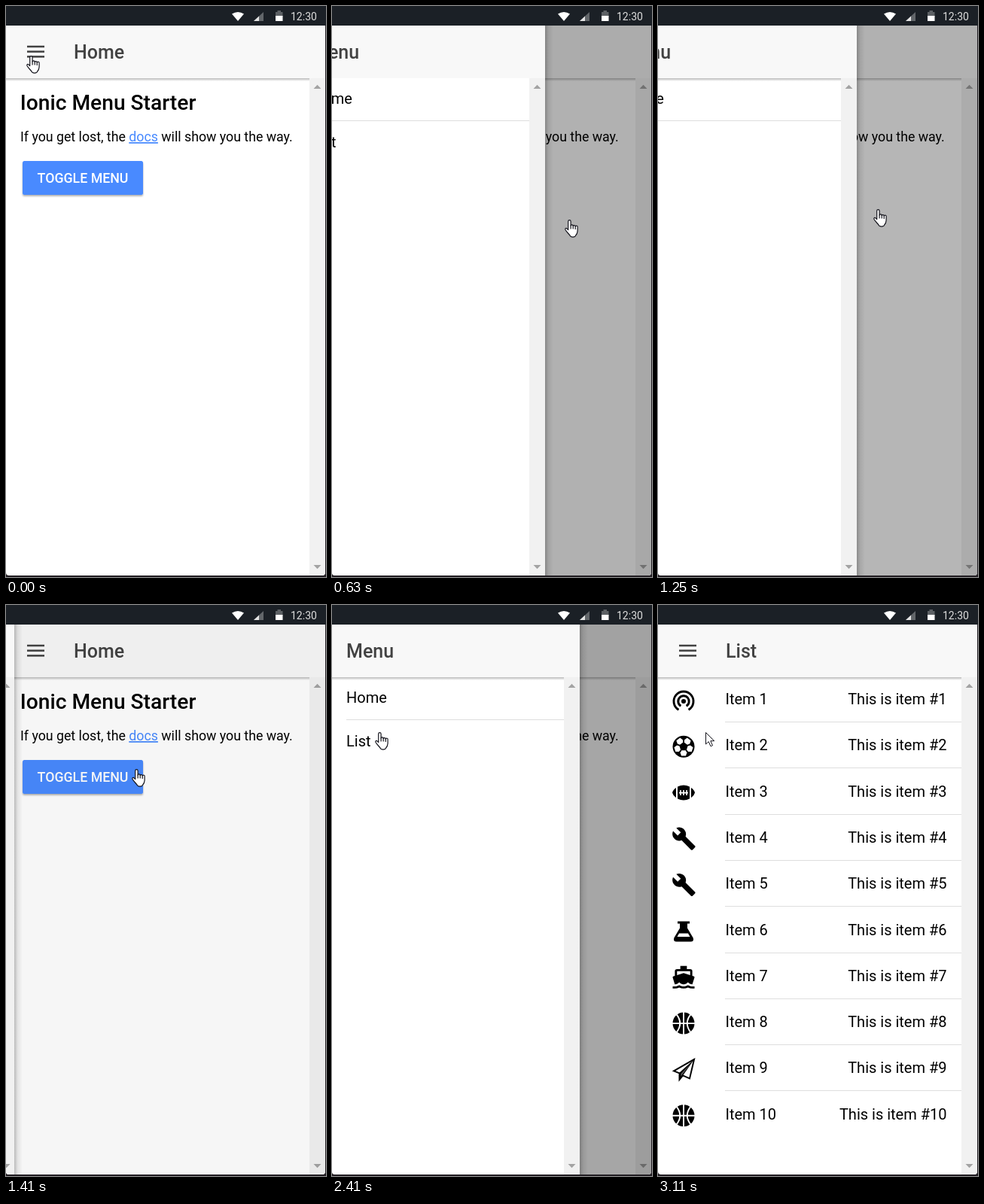
These frames come from a looping animation (425 by 759 pixels, 3.49 s). An HTML page:

```html
<!DOCTYPE html>
<html lang="en">
<head>
<meta charset="utf-8">
<title>Side menu</title>
<style>
  html, body { margin: 0; width: 100%; height: 100%; overflow: hidden; background: #fff; }
  svg { display: block; width: 425px; height: 759px; font-family: Roboto, "Noto Sans", sans-serif; }
  .title { font-size: 25px; font-weight: 500; fill: #424242; }
  .item { font-size: 20px; }
  .copy { font-size: 17.75px; }
  .line { stroke: #dedede; stroke-width: 1; }
</style>
</head>
<body>
<svg viewBox="0 0 425 759">
  <defs>
    <linearGradient id="below" x2="0" y2="1">
      <stop offset="0" stop-opacity=".27"/><stop offset="1" stop-opacity="0"/>
    </linearGradient>
    <linearGradient id="beside">
      <stop offset="0" stop-opacity=".24"/><stop offset=".4" stop-opacity=".08"/><stop offset="1" stop-opacity="0"/>
    </linearGradient>
    <filter id="lift" x="-5%" y="-10%" width="110%" height="130%">
      <feDropShadow dx="0" dy="1.8" stdDeviation="1.2" flood-opacity=".32"/>
    </filter>
    <clipPath id="screen"><path d="M0 26H424V753a4 4 0 0 1-4 4H4a4 4 0 0 1-4-4z"/></clipPath>
  </defs>

  <rect width="425" height="759" fill="#231f24"/>
  <rect width="425" height="26" fill="#1b2026"/>
  <path d="M300 10.5Q308 5.5 316 10.5L308 20z" fill="#fff"/>
  <path d="M329 20L342 8V20z" fill="#62666a"/>
  <path d="M329 20L336 13.5V20z" fill="#e4e4e4"/>
  <path d="M358 8h2.500v-2h4.500v2h2.500v6h-9.500z" fill="#5d6165"/>
  <rect x="358" y="13" width="9.500" height="7" fill="#fff"/>
  <text x="378" y="19" font-size="14" fill="#dcdcdc">12:30</text>

  <g clip-path="url(#screen)">
    <rect y="26" width="424" height="731" fill="#fff"/>
    <g id="home"></g>
    <g id="list"></g>
    <rect id="backdrop" y="26" width="424" height="731"/>
    <g id="panel"></g>
  </g>

  <g id="hand" fill="#fff" stroke="#14141c" stroke-width="1.2" stroke-linejoin="round" stroke-linecap="round">
    <path d="M4.700 13.500V2.400a1.700 1.700 0 0 1 3.400 0V8a1.600 1.600 0 0 1 3.100.4a1.600 1.600 0 0 1 3 .8a1.500 1.500 0 0 1 2.900 1V15c0 3.500-1.700 5.500-3.200 7.200q-3 1.700-6 0C6.300 19.500 3 17 1 13.500c-.8-1.800 1.200-2.800 2.300-1.400z"/>
    <path d="M8.100 8v4M11.200 8.500v3.500M14.200 9.500v3" fill="none"/>
  </g>
  <path id="arrow" transform="translate(63.500 169.500)" d="M0 0V15.500L3.700 12.100L6.500 18.300L9 17.200L6.300 11.200H11.200z" fill="#fff" stroke="#14141c"/>
</svg>
<script>
const byId = id => document.getElementById(id);
const repeat = (n, make) => Array.from({ length: n }, (_, i) => make(i)).join('');

const WIDTH = 329, LOOP = 3490;

const toolbar = (width, title, x) => `
  <rect y="26" width="${width}" height="70" fill="#f8f8f8"/>
  <rect class="shade" y="96" width="${width}" height="4" fill="url(#below)"/>
  <text class="title" x="${x}" y="70">${title}</text>`;

const hamburger = repeat(3, i =>
  `<rect x="28" y="${52.7 + i * 6.7}" width="23" height="2.500" fill="#424242"/>`);

const scrollbar = x => `
  <rect x="${x}" y="96" width="21" height="661" fill="#f1f1f1"/>
  <path d="M${x + 5.5} 110l5-5.200l5 5.200zM${x + 5.5} 743l5 5.200l5-5.200z" fill="#a3a3a3"/>`;

const divider = (x1, x2, y) => `<path class="line" d="M${x1} ${y}H${x2}"/>`;

// Icons are drawn around their own centre.
const polar = (r, deg) => {
  const a = deg * Math.PI / 180;
  return `${(r * Math.cos(a)).toFixed(2)},${(r * Math.sin(a)).toFixed(2)}`;
};
const disc = '<circle r="14.500"/>';
const wrench = `<path transform="scale(1.38) translate(-11.700 -12.200)" d="M22.700 19l-9.100-9.100c.9-2.300.4-5-1.500-6.900-2-2-5-2.400-7.400-1.300L9 6 6 9 1.600 4.700C.4 7.100.9 10.100 2.900 12.100c1.900 1.900 4.600 2.400 6.900 1.500l9.100 9.100c.4.4 1 .4 1.400 0l2.300-2.300c.5-.4.5-1.100.1-1.400z"/>`;
const basketball = disc + `<path d="M0-15V15M-15 0H15M-9.500-12Q0 0-9.500 12M9.500-12Q0 0 9.500 12" fill="none" stroke="#fff" stroke-width="1.900"/>`;
const soccer = disc + repeat(5, i => {
  const a = i * 72 - 54;
  const points = [[5.6, -27], [9, -29], [12.6, -14], [12.6, 14], [9, 29], [5.6, 27]];
  return `<polygon fill="#fff" points="${points.map(([r, d]) => polar(r, a + d)).join(' ')}"/>`;
});
const tether = `<g transform="translate(0 1) scale(1.45)"><circle r="2.100"/>
  <path d="M-4.500 7.800A9 9 0 1 1 4.500 7.800M-2.500 4.330A5 5 0 1 1 2.500 4.330" fill="none" stroke="#000" stroke-width="2"/></g>`;
const football = `<path d="M-8-8Q0-12 8-8V8Q0 12-8 8zM-10-6.500V6.500Q-14 4-15 0Q-14-4-10-6.500zM10-6.500V6.500Q14 4 15 0Q14-4 10-6.500z"/>
  <path d="M-6 0H6M-4-3.500V3.500M0-3.500V3.500M4-3.500V3.500" stroke="#fff" stroke-width="1.600"/>`;
const flask = `<path d="M-8-13H8V-10H5V-4L12.700 9Q14 14 9.500 14H-9.500Q-14 14-12.700 9L-5-4V-10H-8z"/>
  <path d="M-6 3H6L8.500 7.500H-8.500z" fill="#fff"/>`;
const boat = `<path transform="scale(1.45 1.36) translate(-12 -12)" d="M20 21c-1.390 0-2.780-.47-4-1.320-2.440 1.710-5.560 1.710-8 0C6.780 20.530 5.390 21 4 21H2v2h2c1.380 0 2.740-.35 4-.99 2.520 1.290 5.480 1.290 8 0 1.260.65 2.620.99 4 .99h2v-2zM3.950 19H4c1.600 0 3.020-.88 4-2 .98 1.120 2.400 2 4 2s3.020-.88 4-2c.98 1.120 2.400 2 4 2l1.940-6.680q.2-1-.66-1.280L20 10.620V6q0-2-2-2h-3V1H9v3H6Q4 4 4 6v4.620l-1.290.42q-.86.28-.66 1.280zM6 6h12v3.970L12 8 6 9.970z"/>`;
const plane = `<path d="M14-13.500L-13 2L-5.500 5V13.500L-1 8L8 12z" fill="none" stroke="#000" stroke-width="2"/>
  <path d="M14-13.500L-6 4.500V14L-1 8z"/><path d="M9-7.500L-3.500 5.500V9z" fill="#fff" opacity=".35"/>`;
const icons = [tether, soccer, football, wrench, wrench, flask, boat, basketball, plane, basketball];

byId('home').innerHTML = toolbar(424, 'Home', 90) + hamburger + scrollbar(403) + `
  <text x="18.750" y="138" font-size="28.200" font-weight="500">Ionic Menu Starter</text>
  <text class="copy" x="19" y="180">If you get lost, the <tspan fill="#488aff" text-decoration="underline">docs</tspan> will show you the way.</text>
  <rect x="22" y="206" width="160" height="45" rx="2.500" fill="#488aff" filter="url(#lift)"/>
  <text class="copy" x="102" y="235" font-weight="500" fill="#fff" text-anchor="middle">TOGGLE MENU</text>`;

byId('list').innerHTML = toolbar(424, 'List', 90) + hamburger + scrollbar(403) + repeat(10, i => {
  const y = i * 61.3;
  return `<g transform="translate(34 ${127 + y})">${icons[i]}</g>
    <text class="item" x="89.500" y="${132 + y}">Item ${i + 1}</text>
    <text class="item" x="383.500" y="${132 + y}" text-anchor="end">This is item #${i + 1}</text>
    ${i < 9 ? divider(89, 403, Math.round(155 + y) + 0.5) : ''}`;
});

byId('panel').innerHTML = `
  <rect x="${WIDTH}" y="26" width="11" height="731" fill="url(#beside)"/>
  <rect y="26" width="${WIDTH}" height="731" fill="#fff"/>
  ${toolbar(WIDTH, 'Menu', 19)}${scrollbar(308)}
  <text class="item" x="19" y="130">Home</text>
  ${divider(19, 308, 152.5)}
  <text class="item" x="19" y="188">List</text>`;
const panelShade = byId('panel').querySelector('.shade');

// The picture holds between these moments.
const ticks = [0, 70, 240, 310, 480, 560, 630, 710, 790, 860, 940, 1010, 1180, 1250, 1330, 1410, 1480,
  1560, 1640, 1720, 1870, 1950, 2020, 2100, 2180, 2260, 2330, 2410, 2800, 2870, 2950, 3030, 3110];

// Pointer path: time, x, y
const path = [[0, 27, 66], [70, 25, 59], [240, 25, 57], [310, 25, 58], [480, 30, 62], [560, 170, 172],
  [630, 309, 284], [710, 340, 312], [860, 351, 322], [940, 351, 322], [1010, 351, 320], [1180, 345, 316],
  [1250, 286, 270], [1330, 222, 238], [1410, 167, 218], [1640, 133, 217], [1720, 116, 234],
  [2020, 116, 234], [2330, 58, 169], [2410, 57, 169]];

function pointerAt(t) {
  const next = path.findIndex(k => k[0] > t);
  if (next < 0) return path[path.length - 1].slice(1);
  const [t0, x0, y0] = path[next - 1], [t1, x1, y1] = path[next];
  const k = (t - t0) / (t1 - t0);
  return [Math.round(x0 + (x1 - x0) * k), Math.round(y0 + (y1 - y0) * k)];
}

// cubic-bezier(x1, 0, x2, 1)
function ease(x1, x2, x) {
  let lo = 0, hi = 1;
  for (let i = 0; i < 24; i++) {
    const m = (lo + hi) / 2;
    const at = 3 * x1 * m * (1 - m) ** 2 + 3 * x2 * m * m * (1 - m) + m ** 3;
    if (at < x) lo = m; else hi = m;
  }
  return lo * lo * (3 - 2 * lo);
}

const slides = [[482, true], [1165, false], [1940, true], [2790, false]];

function menuAt(t) {
  const slide = slides.filter(s => s[0] <= t).pop();
  if (!slide) return { open: 0, settled: true };
  const [start, opening] = slide;
  const x = (t - start) / 280;
  if (x >= 1) return { open: opening ? 1 : 0, settled: true };
  return { open: opening ? ease(0, 0.2, x) : 1 - ease(0.4, 0.6, x), settled: !opening };
}

const show = (node, on) => node.setAttribute('display', on ? 'inline' : 'none');

function render(time) {
  const t = ticks.filter(k => k <= time).pop();
  const { open, settled } = menuAt(t);
  const [x, y] = pointerAt(t);
  const onList = t >= 2870, arrow = t >= 3030;

  show(byId('home'), !onList);
  show(byId('list'), onList);
  show(byId('panel'), open > 0);
  show(panelShade, settled);
  byId('panel').setAttribute('transform', `translate(${Math.round((open - 1) * WIDTH)} 0)`);
  byId('backdrop').setAttribute('opacity', open > 0 ? 0.025 + 0.325 * open : 0);
  show(byId('arrow'), arrow);
  show(byId('hand'), !arrow);
  byId('hand').setAttribute('transform', `translate(${x} ${y})`);
}

const began = performance.now();
function tick() {
  render((performance.now() - began) % LOOP);
  requestAnimationFrame(tick);
}
tick();
</script>
</body>
</html>
```
